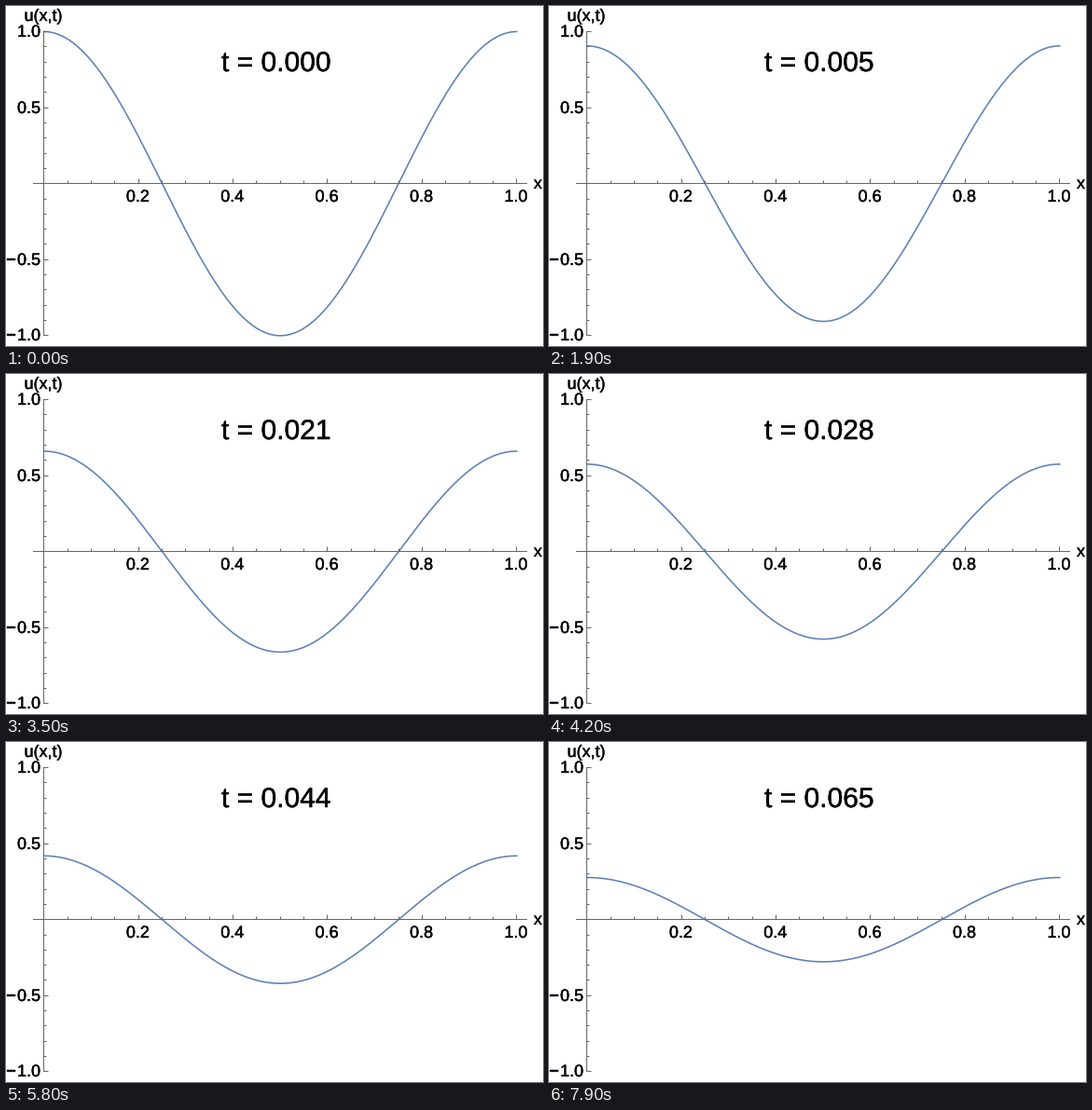
A matplotlib script for the animation above (8000 ms loop, 576 px wide and 365 px high).

```python
import math

import numpy as np
import matplotlib.pyplot as plt
from matplotlib.animation import FuncAnimation
from matplotlib.patheffects import withStroke

W, H, DPI = 576, 365, 100
PX = 72 / DPI                  # points per pixel
X0, Y0 = 40.75, 190.7          # plot origin on the stage
SX, SY = 507, 163.2            # pixels per unit
HOLD, FRAMES, STEP = 14, 80, 100
DECAY = 0.5 * (2 * np.pi) ** 2
GRAY, BLUE = "#666666", "#5e81b5"

plt.rcParams["font.family"] = "Liberation Sans"
fig = plt.figure(figsize=(W / DPI, H / DPI), dpi=DPI, facecolor="white")
ax = fig.add_axes([0, 0, 1, 1])
ax.set(xlim=(0, W), ylim=(H, 0))
ax.axis("off")


def rule(x1, y1, x2, y2):
    ax.plot([x1, x2], [y1, y2], color=GRAY, lw=PX, zorder=3,
            solid_capstyle="butt", snap=False)


def mid(v):
    """Centre of the pixel that holds v."""
    return math.floor(v) + 0.5


def label(x, y, s, size=18, ha="left"):
    weight = withStroke(linewidth=0.4 * PX, foreground="black")
    return ax.text(x, y, s, fontsize=size * PX, ha=ha, va="baseline",
                   color="black", zorder=4, path_effects=[weight])


def draw_axes():
    ox, oy = mid(X0), mid(Y0)
    rule(29, oy, 559, oy)
    rule(ox, 27, ox, 354)
    for i in range(1, 21):
        x = X0 + SX * i / 20
        major = i % 4 == 0
        rule(mid(x), oy, mid(x), oy - (5 if major else 3))
        if major:
            label(x - 0.8, 210, f"{i / 20:.1f}", ha="center")
    for i in range(-10, 11):
        if i == 0:
            continue
        y = mid(Y0 - SY * i / 10)
        major = i % 5 == 0
        rule(ox, y, ox + (5 if major else 3), y)
        if major:
            label(37, y + 5.5, f"{abs(i) / 10:.1f}", ha="right")
            if i < 0:
                label(0, y + 5.5, "\u2212")
    label(566, 196, "x")
    label(19.5, 16, "u(x,t)")


draw_axes()
xs = np.linspace(0, 1, 301)
wave = np.cos(2 * np.pi * xs)
curve, = ax.plot(X0 + SX * xs, Y0 - SY * wave, color=BLUE, lw=1.6 * PX, zorder=2)
clock = label(231, 70, "t = 0.000", size=30)


def update(n):
    t = max(0, n - HOLD) / 1000
    curve.set_ydata(Y0 - SY * np.exp(-DECAY * t) * wave)
    clock.set_text(f"t = {t:.3f}")
    return curve, clock


anim = FuncAnimation(fig, update, frames=FRAMES, interval=STEP,
                     repeat=True, repeat_delay=0, blit=False)
plt.show()
```
